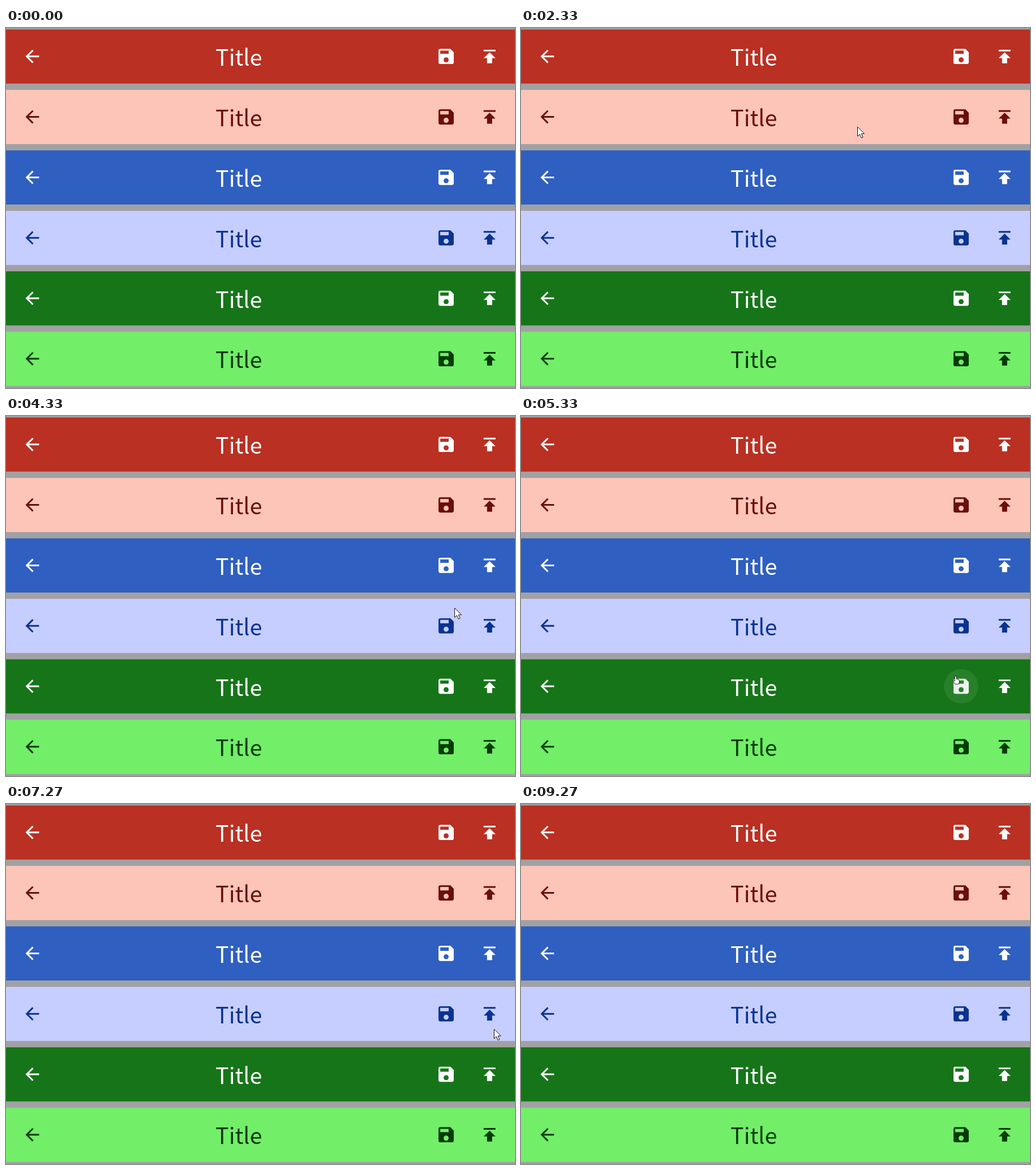
An HTML page for the animation above (9940 ms loop, 890 by 630 pixels).

```html
<!DOCTYPE html>
<html lang="en">
<head>
<meta charset="utf-8">
<title>App bars</title>
<style>
  html, body { margin: 0; width: 100%; height: 100%; overflow: hidden; background: #a1a1a4; }
  svg { display: block; width: 890px; height: 630px; }
  text { font: 39px "Noto Sans CJK SC", "Noto Sans CJK JP", "Noto Sans CJK", "Noto Sans", sans-serif; }
  .halo { visibility: hidden; }
  .hover .halo { visibility: visible; }
  .hover .icon { opacity: .9; }
  #arrow, #hand { fill: #fff; stroke: #111; stroke-linejoin: round; }
</style>
</head>
<body>
<svg viewBox="0 0 890 630">
  <g id="bars"></g>
  <g id="cursor">
    <path id="arrow" d="M.5 1V17.5l3.9-3.6 2.8 6.4 2.7-1.2-2.8-6.2h5.2z"/>
    <path id="hand" stroke-width=".9" d="M-1.5 0Q0-1.5 1.5 0V4.3L5.6 5.2Q6.6 5.6 6.6 6.8V9.6L5.3 13.2H-.8L-4 8.6Q-4.9 7-3.8 6.5L-1.5 7.8Z"/>
  </g>
</svg>
<script>
const LOOP = 9940, STEP = 1000 / 15;
const PITCH = 105.8, RADIUS = 30;

// background and foreground; dark and light bars alternate
const COLORS = [
  ['#ba3022', '#fff'], ['#fdc5b8', '#690f0c'],
  ['#2f5fc0', '#fff'], ['#c6ceff', '#0a3390'],
  ['#167519', '#fff'], ['#72ee68', '#043b05']
];

const ICONS = [
  [46, 'M20 11H7.83l5.59-5.59L12 4l-8 8 8 8 1.41-1.41L7.83 13H20v-2z'],
  [769.6, 'M17 3H5c-1.11 0-2 .9-2 2v14c0 1.1.89 2 2 2h14c1.1 0 2-.9 2-2V7l-4-4zm-5 16c-1.66 0-3-1.34-3-3s1.34-3 3-3 3 1.34 3 3-1.34 3-3 3zm3-10H5V5h10v4z'],
  [845.6, 'M5 4v2h14V4H5zm0 10h4v6h6v-6h4l-7-7-7 7z']
];

// pointer moves: first tick, last tick, goal; it rests in between
const ENTRY = { tick: 8, x: 50, y: 40 };
const MOVES = [
  [8, 10, 48, 24],
  [17, 22, 72, 171],
  [24, 29, 58, 150],
  [30, 36, 647, 174],
  [38, 43, 771, 122],
  [51, 56, 766, 14],
  [56, 65, 784, 335],
  [67, 77, 775, 518],
  [78, 80, 760, 456],
  [80, 85, 765, 551],
  [91, 94, 765, 571],
  [98, 105, 850, 478],
  [105, 118, 864, 136],
  [120, 135, 375, 480],
  [135, 138, 171, 580]
];
const EXIT = 138;

const $ = id => document.getElementById(id);
const show = (el, on) => el.setAttribute('visibility', on ? 'visible' : 'hidden');

function add(parent, tag, attrs) {
  const el = document.createElementNS('http://www.w3.org/2000/svg', tag);
  for (const key in attrs) el.setAttribute(key, attrs[key]);
  return parent.appendChild(el);
}

const buttons = [];
COLORS.forEach(([back, fore], i) => {
  const top = 2.6 + PITCH * i, cy = top + 47.2;
  const bar = add($('bars'), 'g', { fill: fore });
  add(bar, 'rect', { y: top, width: 890, height: 94.7, fill: back });
  add(bar, 'text', { x: 366.3, y: top + 63.7 }).textContent = 'Title';
  for (const [cx, d] of ICONS) {
    const el = add(bar, 'g', {});
    add(el, 'circle', { class: 'halo', cx, cy, r: RADIUS, 'fill-opacity': i % 2 ? .09 : .08 });
    add(el, 'path', { class: 'icon', d, transform: `translate(${cx} ${cy}) scale(1.48) translate(-12 -12)` });
    buttons.push({ el, cx, cy });
  }
});

// soft start and stop
function ease(k) {
  const a = k ** 1.365, b = (1 - k) ** 1.365;
  return a / (a + b);
}

function pointAt(tick) {
  if (tick < ENTRY.tick || tick > EXIT) return null;
  let { x, y } = ENTRY;
  for (const [from, to, goalX, goalY] of MOVES) {
    if (tick <= from) break;
    const k = ease(Math.min(1, (tick - from) / (to - from)));
    x += (goalX - x) * k;
    y += (goalY - y) * k;
  }
  return [Math.round(x), Math.round(y)];
}

function render(time) {
  const tick = Math.floor((time % LOOP + 6) / STEP);
  const pos = pointAt(tick);
  // hover reacts one tick after the pointer
  const last = pos && pointAt(tick - 1);
  let active = false;
  for (const { el, cx, cy } of buttons) {
    const on = !!last && Math.hypot(last[0] - cx, last[1] - cy) < RADIUS;
    el.classList.toggle('hover', on);
    active = active || on;
  }
  show($('arrow'), pos && !active);
  show($('hand'), pos && active);
  if (pos) $('cursor').setAttribute('transform', `translate(${pos})`);
}

const start = performance.now();
function loop() {
  render(performance.now() - start);
  requestAnimationFrame(loop);
}
loop();
</script>
</body>
</html>
```
